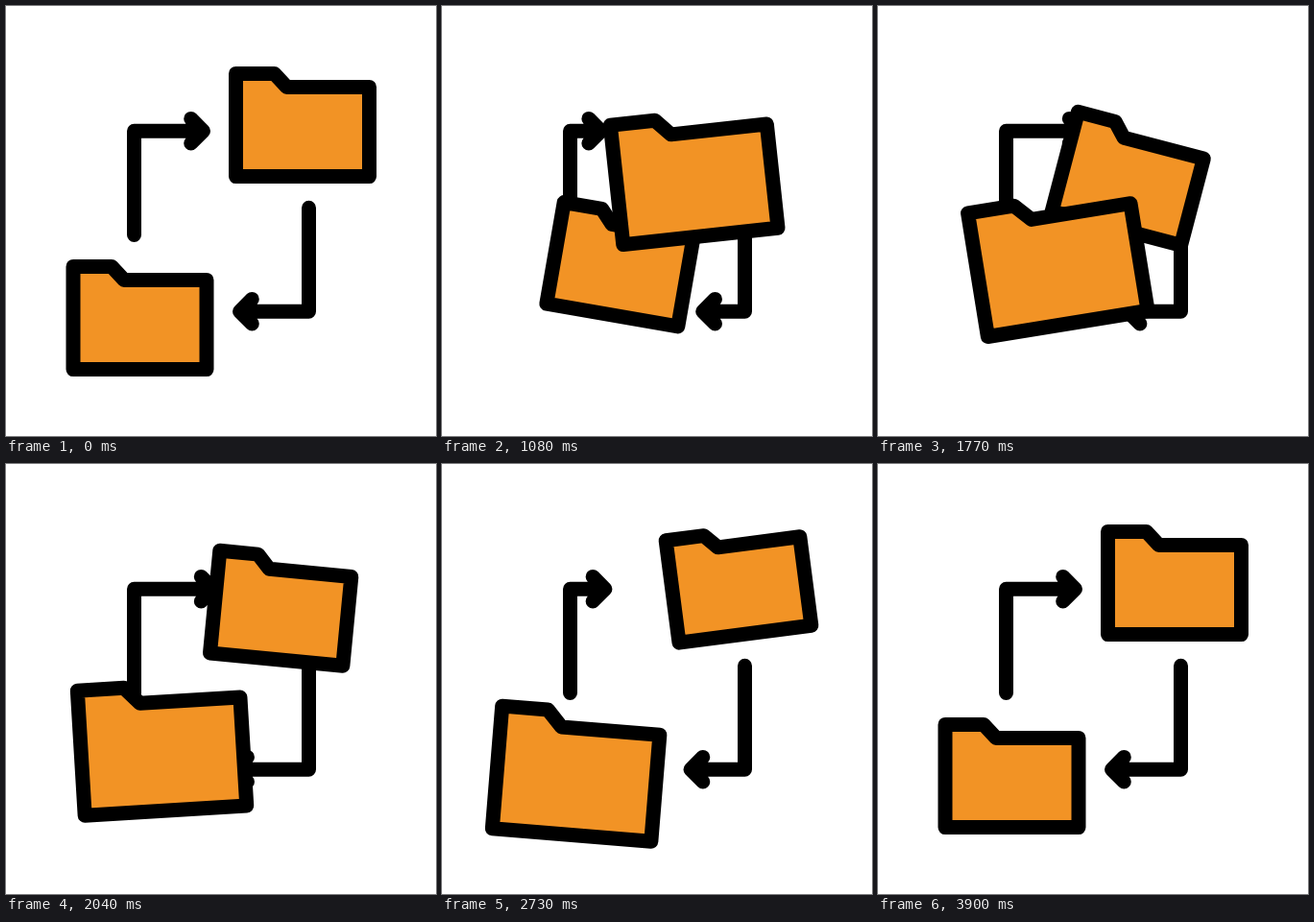
Animation, 448 px wide and 448 px high, one loop 4500 ms. Source, as an HTML page:

```html
<!DOCTYPE html>
<html lang="en">
<head>
<meta charset="utf-8">
<title>Folder exchange</title>
<style>
  html, body { margin: 0; width: 100%; height: 100%; overflow: hidden; background: #fff; }
  svg { display: block; width: 100vw; height: 100vh; }
  path { fill: none; stroke: #000; stroke-width: 15; stroke-linecap: round; stroke-linejoin: round; }
  .folder { fill: #f29325; }
</style>
</head>
<body>
<svg viewBox="0 0 448 448">
  <path id="upper"/>
  <path id="lower"/>
  <path id="back" class="folder"/>
  <path id="front" class="folder"/>
</svg>
<script>
const LOOP = 4500, STEP = 30, START = 300, LAG = 300;
const $ = id => document.getElementById(id);

// Smooth rise from 0 to 1 between times a and b
function ramp(t, a, b) {
  const u = Math.min(1, Math.max(0, (t - a) / (b - a)));
  return u * u * (3 - 2 * u);
}
// Rise until b, then fall until c
const pulse = (t, a, b, c) => ramp(t, a, b) - ramp(t, b, c);

const travel = t => ramp(t, START, 2550);
const growth = t => 1 + 0.215 * (ramp(t, START, 1425) - ramp(t, 2500, 3710));
const swing = t => pulse(t, START, 1650, 2505) - 0.51 * pulse(t, 1650, 2505, 3710);
const pull = t => 40 * pulse(t, START, 1050, 1950)
                - 12 * pulse(t, 1050, 1950, 2850)
                + 38 * pulse(t, 1950, 2850, 3600);

const right = { x: 309, y: 124 }, left = { x: 139.5, y: 325 };
const HALF_W = 69.5, HALF_H = 53.6, TAB_W = 40, SLOPE_W = 13, TAB_H = 14;
const PIVOT = { x: -4, y: 12 };

function outline() {
  const tab = TAB_W - HALF_W, shelf = TAB_H - HALF_H;
  return [[-HALF_W, -HALF_H], [tab, -HALF_H], [tab + SLOPE_W, shelf],
          [HALF_W, shelf], [HALF_W, HALF_H], [-HALF_W, HALF_H]];
}

// The outline is transformed point by point so the stroke keeps its width
function folder(id, from, to, p, scale, deg) {
  const r = deg * Math.PI / 180, c = Math.cos(r) * scale, s = Math.sin(r) * scale;
  const x0 = from.x + (to.x - from.x) * p - PIVOT.x * (scale - 1);
  const y0 = from.y + (to.y - from.y) * p - PIVOT.y * (scale - 1);
  const pts = outline().map(([x, y]) =>
    (x0 + x * c - y * s).toFixed(2) + ' ' + (y0 + x * s + y * c).toFixed(2));
  $(id).setAttribute('d', 'M' + pts.join('L') + 'Z');
}

function arrow(id, x, y0, y, tip, dir) {
  const barb = 12.8, back = tip - barb * dir;
  $(id).setAttribute('d',
    `M${x} ${y0}V${y}H${tip}M${back} ${y - barb}L${tip} ${y}L${back} ${y + barb}`);
}

function draw(t) {
  const p = travel(t), s = swing(t);
  arrow('upper', 133.5, 238.5, 130.2, 205.5 - pull(t), 1);
  arrow('lower', 315.5, 210.2, 318.2, 243.5 + pull(t - LAG), -1);
  folder('back', left, right, p, 1, 16 * s);
  folder('front', right, left, p, growth(t), -10 * s);
}

const start = performance.now();
function tick() {
  const t = (performance.now() - start) % LOOP;
  draw(Math.floor(t / STEP) * STEP);
  requestAnimationFrame(tick);
}
tick();
</script>
</body>
</html>
```
